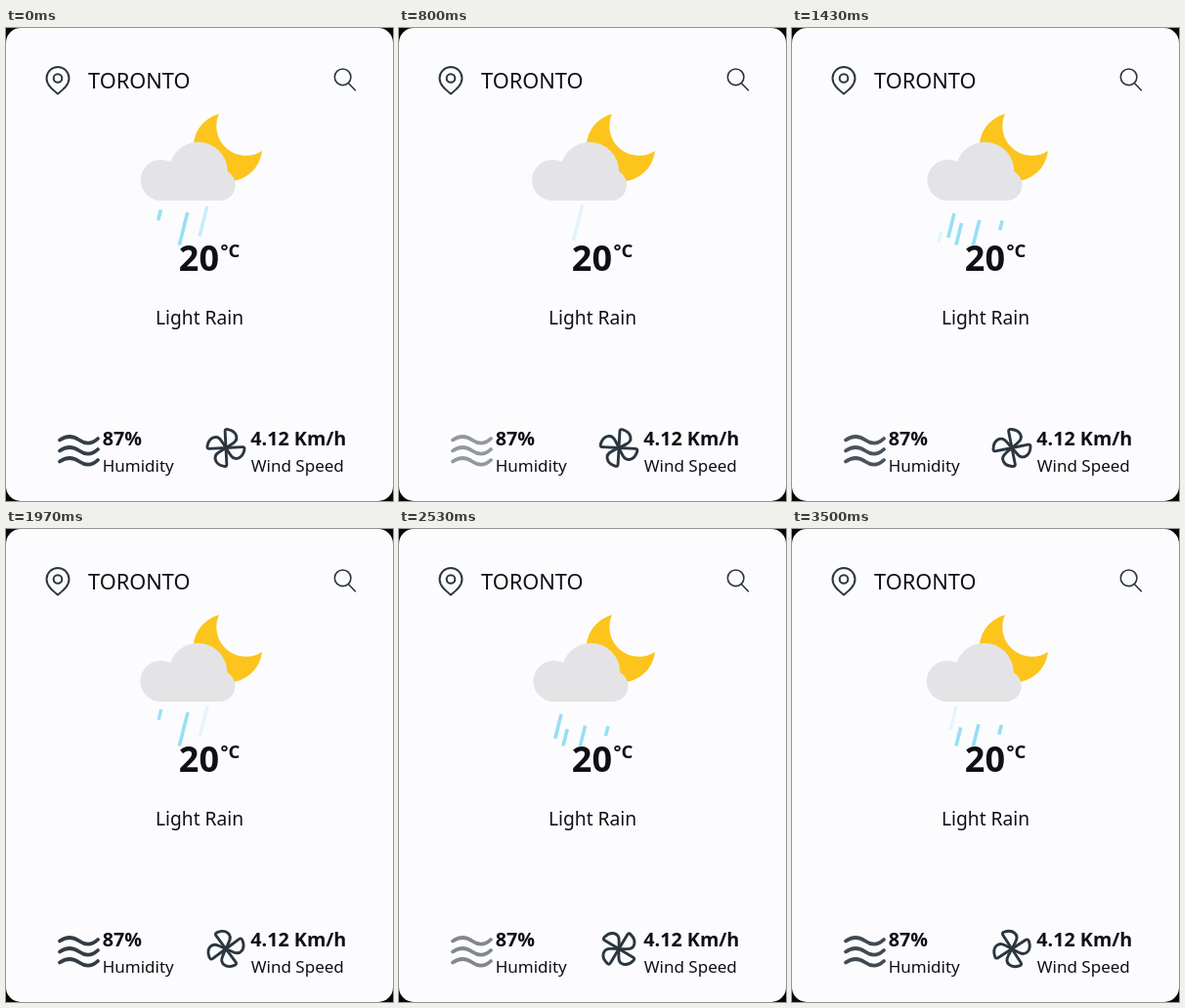
An HTML page for the animation above (3.53 s loop, 396 px wide and 485 px high).

```html
<!DOCTYPE html>
<html lang="en">
<head>
<meta charset="utf-8">
<title>Weather card</title>
<style>
  html, body { margin: 0; width: 100%; height: 100%; overflow: hidden; background: #080808; }
  svg { display: block; width: 396px; height: 485px; }
  text { font-family: "Noto Sans", "Open Sans", sans-serif; fill: #0f1014; }
  .bold { font-weight: 600; font-size: 19.7px; }
  .label { font-size: 17px; }
  .line { fill: none; stroke: #2b363f; stroke-linecap: round; stroke-linejoin: round; }
</style>
</head>
<body>
<svg viewBox="0 0 396 485">
  <defs>
    <clipPath id="sky"><path d="M130 178H250V222.5H130z"/></clipPath>
    <path id="blade" d="M0 0V-17Q0-19.500 3-18.800C12-16.500 14.500-8 7-4Q3-1.500 0 0"/>
    <path id="wave" d="M55 0q10-7 20 0t19-1.500"/>
  </defs>
  <rect width="396" height="485" rx="15" fill="#fcfcff"/>

  <g class="line" stroke-width="2">
    <path d="M53 67.500C48 63.500 41.500 58.500 41.500 51.500a11.500 11.500 0 0 1 23 0C64.500 58.500 58 63.500 53 67.500z"/>
    <circle cx="53" cy="51.500" r="4.300"/>
  </g>
  <text x="84" y="62.300" font-size="21.800">TORONTO</text>
  <g class="line" stroke-width="1.600">
    <circle cx="344.600" cy="50.300" r="8.300"/>
    <path d="M350.600 56.800l6.700 7"/>
  </g>

  <path d="M218 88A35.300 35.300 0 1 0 262 126A30.300 30.300 0 0 1 218 88z" fill="#fcc41c"/>
  <g id="rain" clip-path="url(#sky)" stroke="#98dff4" stroke-width="3.600"></g>
  <g id="cloud" fill="#e4e4e6">
    <circle cx="159" cy="156" r="21"/>
    <circle cx="197" cy="147" r="30"/>
    <circle cx="219" cy="161" r="16"/>
    <path d="M159 150H219V177H159z"/>
  </g>

  <text x="176.800" y="249.400" font-size="36" font-weight="700">20</text>
  <text x="219.500" y="234.500" font-size="18.600" font-weight="600">°C</text>
  <text x="153" y="304.300" font-size="19.200">Light Rain</text>

  <g id="waves" class="line" stroke-width="3.700">
    <use href="#wave" y="422.500"/>
    <use href="#wave" y="433.500"/>
    <use href="#wave" y="444.500"/>
  </g>
  <text class="bold" x="98.700" y="428.300">87%</text>
  <text class="label" x="98.700" y="455.300">Humidity</text>

  <g id="fan" class="line" stroke-width="2.900">
    <use href="#blade"/>
    <use href="#blade" transform="rotate(90)"/>
    <use href="#blade" transform="rotate(180)"/>
    <use href="#blade" transform="rotate(270)"/>
  </g>
  <text class="bold" x="250.300" y="428.300">4.12 Km/h</text>
  <text class="label" x="250.800" y="455.300">Wind Speed</text>
</svg>
<script>
  const LOOP = 3530, TOP = 180, SLANT = 0.25;
  const byId = id => document.getElementById(id);
  const cloud = byId('cloud'), waves = byId('waves'), fan = byId('fan'), rain = byId('rain');

  // x at the cloud base, length, start (s), speed (px/s), life (s), period (s)
  const drops = [
    [160, 11, 0.88, 52, 0.58, 1],
    [168.5, 25, 0.18, 66, 0.54, 1.1],
    [178.5, 31, 0.03, 50, 0.65, 1],
    [188, 37, 0.775, 40, 0.50, 1],
    [196, 31, 0.08, 48, 0.60, 1],
    [206.5, 31, 0.95, 55, 0.42, 1],
    [219.5, 10, 0.06, 47, 0.62, 1]
  ].map(([x, len, start, speed, life, period]) => {
    const el = document.createElementNS('http://www.w3.org/2000/svg', 'path');
    el.setAttribute('d', `M${x} ${TOP}l${-SLANT * len} ${len}`);
    rain.append(el);
    return { el, start, speed, life, period };
  });

  const clamp = v => Math.max(0, Math.min(1, v));

  function draw(ms) {
    const s = ms / 1000;
    for (const d of drops) {
      const age = (s - d.start + d.period) % d.period;
      const fall = age * d.speed;
      d.el.setAttribute('transform', `translate(${-SLANT * fall} ${fall})`);
      d.el.setAttribute('opacity', Math.min(clamp(age / 0.1), clamp((d.life - age) / 0.12)));
    }
    const sway = 1.7 * Math.sin(2 * Math.PI * s) - 0.3;
    cloud.setAttribute('transform', `translate(${sway} 0)`);
    waves.setAttribute('opacity', 0.75 + 0.25 * Math.cos(Math.PI * (s + 0.2)));
    fan.setAttribute('transform', `translate(225 430.500) rotate(${120 * s - 3})`);
  }

  const begin = performance.now();
  function tick() {
    draw((performance.now() - begin) % LOOP);
    requestAnimationFrame(tick);
  }
  tick();
</script>
</body>
</html>
```
